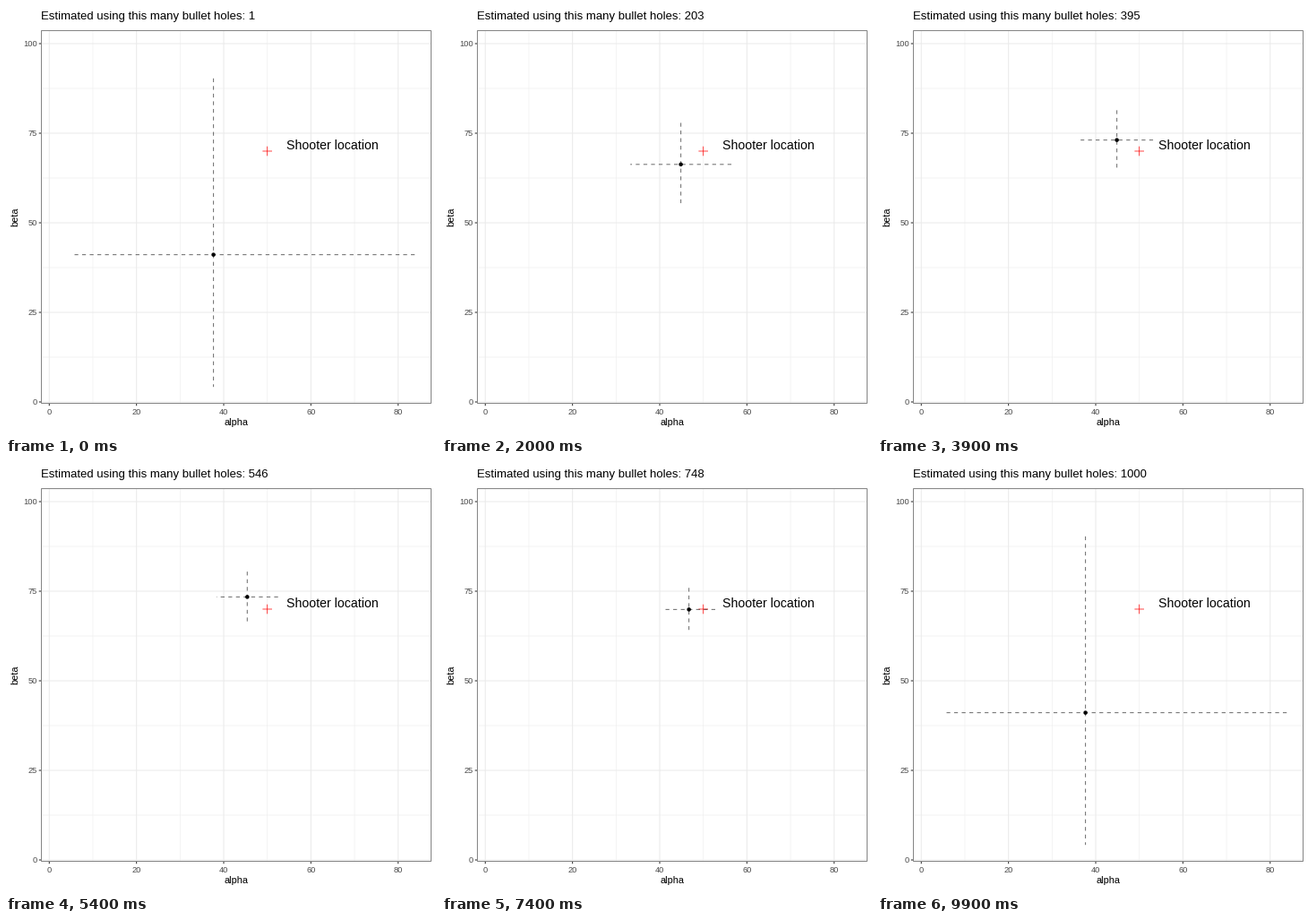
Recreate the animation shown at these times as a matplotlib script. Size 480 by 480 pixels, loop 10000 ms.

```python
import numpy as np
import matplotlib.pyplot as plt
from matplotlib.animation import FuncAnimation
from matplotlib.patches import Circle, Rectangle

SIZE, DPI = 480, 72          # at 72 dpi one point is one pixel
FRAMES, INTERVAL = 100, 100
LEFT, RIGHT, TOP, BOTTOM = 39.5, 474.5, 27.5, 443.5
THICK, THIN = 1.067, 0.533

# first estimate as (middle, low, high), also reached again at the end
FIRST_ALPHA = np.array([37.65, 5.8, 83.8])
FIRST_BETA = np.array([41.1, 4.2, 90.3])
# where the estimate wanders in between: step, alpha, beta
STEPS, ALPHAS, BETAS = zip((7, 34.9, 86.7), (20, 44.85, 66.3),
                           (39, 44.85, 73.1), (54, 45.4, 73.4),
                           (74, 46.7, 69.9), (86, 44.6, 67.8))

plt.rcParams["font.family"] = "Liberation Sans"
plt.rcParams["path.snap"] = False

fig = plt.figure(figsize=(SIZE / DPI, SIZE / DPI), dpi=DPI, facecolor="white")
ax = fig.add_axes([0, 0, 1, 1])
ax.set_xlim(0, SIZE)
ax.set_ylim(SIZE, 0)
ax.axis("off")


def px(alpha):
    return 48.3 + 4.868 * np.asarray(alpha)


def py(beta):
    return 442 - 4 * np.asarray(beta)


def line(xs, ys, color, width, z, **kw):
    return ax.plot(xs, ys, color=color, lw=width, zorder=z,
                   solid_capstyle="butt", dash_capstyle="butt", **kw)[0]


def label(x, y, text, size, color="black", ha="center", **kw):
    return ax.text(x, y, text, fontsize=size, color=color, ha=ha,
                   va="baseline", zorder=8, **kw)


def grid_x(alpha, width):
    line([px(alpha)] * 2, [TOP, BOTTOM], "#ebebeb", width, 1)


def grid_y(beta, width):
    line([LEFT, RIGHT], [py(beta)] * 2, "#ebebeb", width, 1)


for a in range(10, 80, 20):
    grid_x(a, THIN)
for b in np.arange(12.5, 100, 25):
    grid_y(b, THIN)
for a in range(0, 81, 20):
    grid_x(a, THICK)
    line([px(a)] * 2, [BOTTOM, BOTTOM + 2.75], "#333333", THICK, 2)
    label(px(a), 455.6, str(a), 9.3, "#4d4d4d")
for b in range(0, 101, 25):
    grid_y(b, THICK)
    line([LEFT - 2.75, LEFT], [py(b)] * 2, "#333333", THICK, 2)
    label(34.8, py(b) + 3.2, str(b), 9.3, "#4d4d4d", ha="right")

ax.add_patch(Rectangle((LEFT, TOP), RIGHT - LEFT, BOTTOM - TOP, fill=False,
                       edgecolor="#858585", lw=1, zorder=7))

label(257, 468, "alpha", 11)
label(13.7, 235.3, "beta", 11, rotation=90, rotation_mode="anchor")
title = label(39.4, 15.2, "", 13.1, ha="left")

# true position
cx, cy, arm = px(50), py(70), 5.3
line([cx - arm, cx + arm], [cy, cy], "red", 0.72, 3)
line([cx, cx], [cy - arm, cy + arm], "red", 0.72, 3)
label(px(65), 159.6, "Shooter location", 14.1)

# estimate with its intervals
dashed = dict(color="black", width=THICK, z=4, alpha=0.55,
              linestyle=(0, (4, 4)))
h_bar = line([], [], **dashed)
v_bar = line([], [], **dashed)
dot = ax.add_patch(Circle((0, 0), 2.25, color="black", lw=0, zorder=5))


def interval(middle, half):
    return np.clip([middle, middle - half, middle + half], 0, 99)


def update(i):
    holes = 1 + 999 * i / (FRAMES - 1)
    half = 165 / np.sqrt(holes)      # uncertainty shrinks with more data
    settled = np.interp(i, [0, STEPS[0], STEPS[-1], FRAMES - 1], [0, 1, 1, 0])

    def blend(first, track):
        found = interval(np.interp(i, STEPS, track), half)
        return first + settled * (found - first)

    a, a_lo, a_hi = blend(FIRST_ALPHA, ALPHAS)
    b, b_lo, b_hi = blend(FIRST_BETA, BETAS)
    h_bar.set_data(px([a_hi, a_lo]), py([b, b]))
    v_bar.set_data(px([a, a]), py([b_hi, b_lo]))
    dot.center = px(a), py(b)
    title.set_text(f"Estimated using this many bullet holes: {round(holes)}")
    return h_bar, v_bar, dot, title


anim = FuncAnimation(fig, update, frames=FRAMES, interval=INTERVAL,
                     repeat=True, repeat_delay=0)
plt.show()
```
